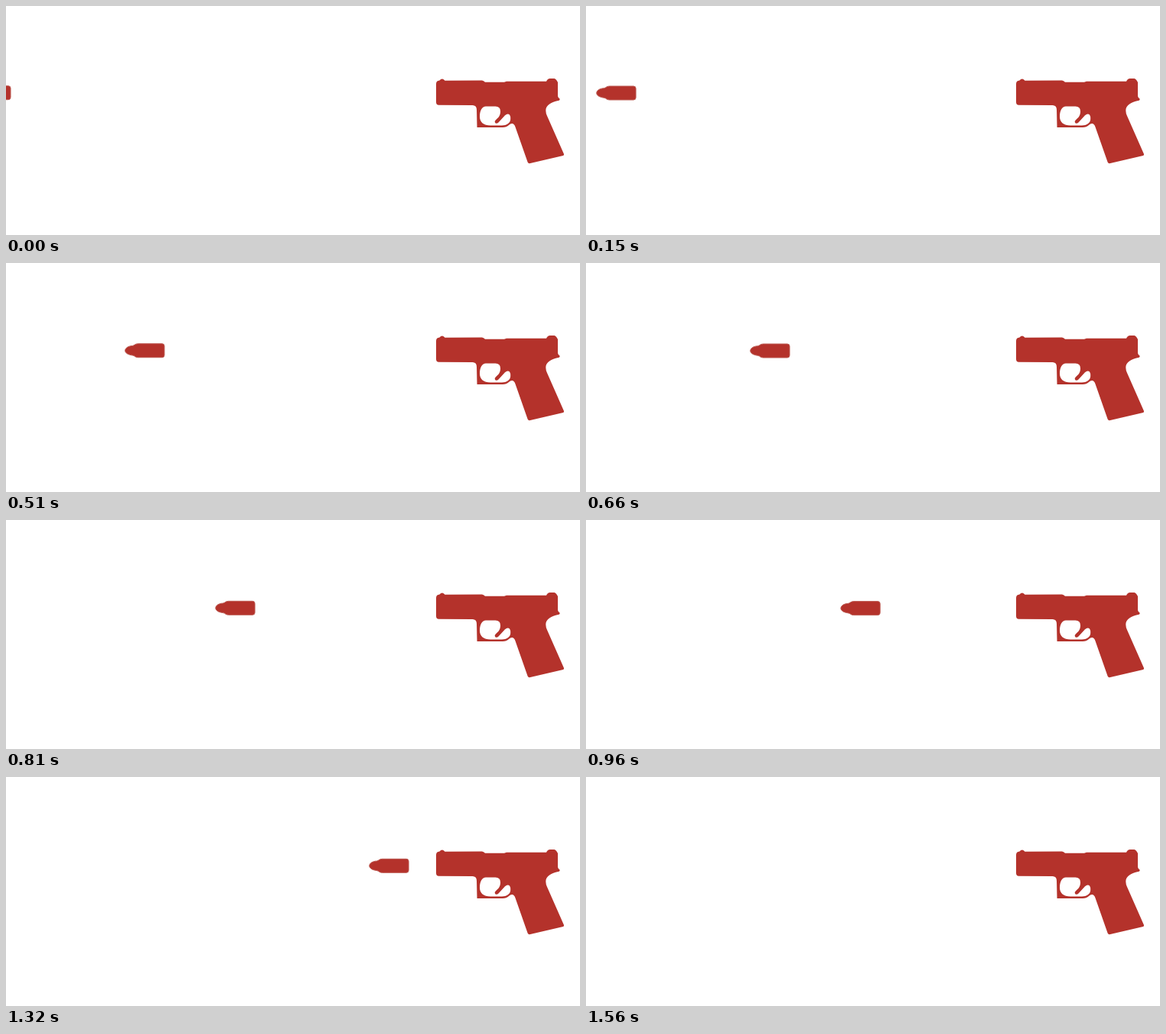
Animation, 750 px wide and 300 px high, one loop 2090 ms. Source, as an HTML page:

```html
<!DOCTYPE html>
<html lang="en">
<head>
<meta charset="utf-8">
<title>Bullet and pistol</title>
<style>
  html, body { margin: 0; width: 100%; height: 100%; overflow: hidden; background: #fff; }
  svg { display: block; width: 750px; height: 300px; }
  path { fill: #b4322b; }
  #bullet { stroke: #bd5a52; stroke-width: 1; }
</style>
</head>
<body>
<svg viewBox="0 0 750 300">
  <!-- right end of the bullet is x = 0, its top is y = 0 -->
  <path id="bullet" d="M-51.8 9.6 C-51.8 6.5 -48 3.4 -42 3.2 C-39.5 2.8 -39 .6 -35 .5 H-3.5
    Q-.5 .5 -.5 3.5 V15.5 Q-.5 18.5 -3.5 18.5 H-35 C-39 18.4 -39 16.2 -42 15.8 C-48 15 -51.8 12.6 -51.8 9.6 Z"/>
  <path fill-rule="evenodd" d="M562 102 Q562 98 566.5 97.6 Q568 95.4 570 95.4 Q572 95.5 573.5 97.8
    L622 97.5 Q624 97.7 626 99.7 H651 L654 98.7 L706 98.8 Q707.5 95 711 95 H716 Q718.5 95 721 100
    V118 Q721.3 120 723.5 121.5 Q724 123.5 721.5 124 C713 125.5 705 130 705.3 137 Q705.4 141 707 144
    L729 194 Q729.4 195.5 728 196 L684 206.3 Q682.4 206.5 681.6 204.5 L665.5 158.5
    Q664 153.8 661 153.9 Q659 154 657 156 Q654 159 649 159 H615.5 L615 136 Q615 130.2 609.5 130
    L565.5 129.8 Q562 129.5 562 126 Z
    M627 131.5 H639.5 Q646 131.5 646 138 C646 144 643 146.5 639.5 149.7 Q637.8 151.5 639.3 153.2
    Q641.4 154.6 643.5 152.5 L652 143.3 Q655.5 140.2 658 142.5 Q659.3 144 659.2 148
    C659 153.5 654 156.5 648 156.5 H633 C624 156.5 619 152 619 145 C619 137 622 131.5 627 131.5 Z"/>
</svg>
<script>
  const LOOP = 2090, STEP = 30, LAST = 52;
  const bullet = document.getElementById('bullet');

  function draw(now) {
    const n = Math.min(Math.floor((now % LOOP) / STEP), LAST);
    // the last step leaves the bullet hidden inside the barrel
    const x = 6.5 + n * 11.82;
    const y = 104.2 + n * 0.06;
    bullet.setAttribute('transform', `translate(${x} ${y})`);
  }

  const start = performance.now();
  function tick() {
    draw(performance.now() - start);
    requestAnimationFrame(tick);
  }
  tick();
</script>
</body>
</html>
```
